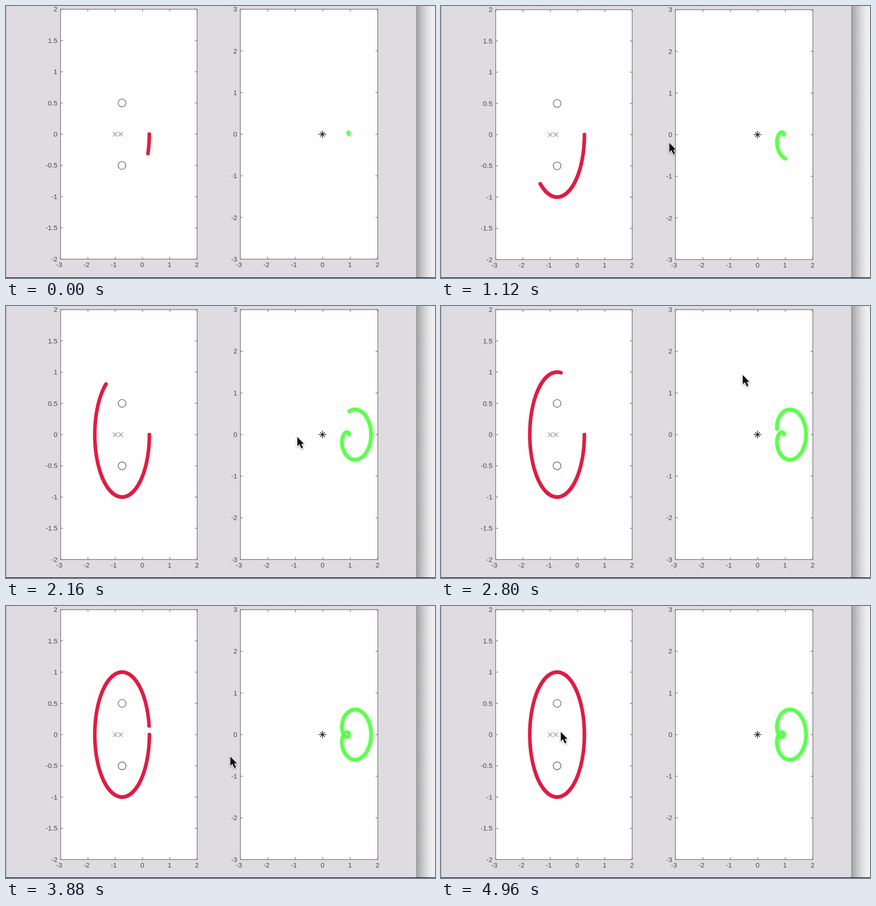
An HTML page with a canvas for the animation above (5000 ms loop, 938x596 px).

```html
<!DOCTYPE html>
<html lang="en">
<head>
<meta charset="utf-8">
<title>Contour mapping</title>
<style>
  html, body { margin: 0; width: 100%; height: 100%; overflow: hidden; background: #dedce0; }
  canvas { display: block; }
</style>
</head>
<body>
<canvas id="stage" width="938" height="596"></canvas>
<script>
const W = 938, H = 596, LOOP = 5000, TAU = Math.PI * 2;
const ctx = document.getElementById('stage').getContext('2d');

const makePlot = (left, right, yMax, yStep) => ({
  left, right, top: 8, bottom: 555.5, yMax, yStep,
  x: v => left + (v + 3) * (right - left) / 5,
  y: v => 281.8 - v * 273.75 / yMax
});
const sPlane = makePlot(119.5, 418, 2, 0.5);
const wPlane = makePlot(512.5, 813, 3, 1);

// Keyed values: [time, ...components]
const sweepKeys = [[0, 18], [680, 78], [1640, 188.8], [2160, 234], [2280, 244], [3440, 322], [3980, 360]];
const panKeys = [[0, -0.2, -0.9], [680, 0.8, 1.1], [1160, 0, 0]];
const pointerKeys = [
  [300, 420, 600], [680, 277, 283], [1640, 785, 322], [2160, 637, 287], [2840, 660, 150],
  [3120, 690, 22], [3440, 738, 307], [4320, 243, 353], [4960, 262, 276]
];

const linear = u => u;
const smooth = u => u * u * (3 - 2 * u);

function sample(keys, t, ease = linear) {
  if (t <= keys[0][0]) return keys[0].slice(1);
  const i = keys.findIndex(k => k[0] > t);
  if (i < 0) return keys[keys.length - 1].slice(1);
  const a = keys[i - 1], b = keys[i];
  const u = ease((t - a[0]) / (b[0] - a[0]));
  return a.slice(1).map((v, j) => v + (b[j + 1] - v) * u);
}

function line(x1, y1, x2, y2) {
  ctx.beginPath();
  ctx.moveTo(x1, y1);
  ctx.lineTo(x2, y2);
  ctx.stroke();
}

function stroke(color, width) {
  ctx.strokeStyle = color;
  ctx.lineWidth = width;
}

function cross(x, y, r) {
  line(x - r, y - r, x + r, y + r);
  line(x - r, y + r, x + r, y - r);
}

function drawWindow(gray) {
  ctx.fillStyle = gray;
  ctx.fillRect(-5, -5, W + 10, H + 10);
  const shade = ctx.createLinearGradient(898, 0, 932, 0);
  shade.addColorStop(0, '#a2a2a4');
  shade.addColorStop(0.3, '#c0c0c2');
  shade.addColorStop(0.7, '#e0e0e0');
  shade.addColorStop(1, '#eeeeee');
  ctx.fillStyle = shade;
  ctx.fillRect(898, -5, 50, H + 10);
  ctx.fillStyle = '#8f8f92';
  ctx.fillRect(897, -5, 1.5, H + 10);
  ctx.fillStyle = '#a9a8ab';
  ctx.fillRect(-5, -5, 6, H + 10);
}

function drawAxes(p) {
  ctx.fillStyle = '#fefefe';
  ctx.fillRect(p.left, p.top, p.right - p.left, p.bottom - p.top);
  stroke('#686868', 1.3);
  ctx.strokeRect(p.left, p.top, p.right - p.left, p.bottom - p.top);
  ctx.fillStyle = '#484848';
  ctx.font = '15px "Liberation Sans", Arial, sans-serif';
  ctx.textBaseline = 'middle';
  ctx.textAlign = 'right';
  for (let v = -3; v <= 2; v++) {
    const x = p.x(v);
    line(x, p.top, x, p.top + 5);
    line(x, p.bottom, x, p.bottom - 5);
    ctx.fillText(v, x + 3.5, 569);
  }
  for (let v = -p.yMax; v <= p.yMax; v += p.yStep) {
    const y = p.y(v);
    line(p.left, y, p.left + 5, y);
    line(p.right, y, p.right - 5, y);
    ctx.fillText(v, p.left - 7, y + 1);
  }
}

function drawMarkers() {
  stroke('#505068', 1.3);
  for (const v of [0.5, -0.5]) {
    ctx.beginPath();
    ctx.arc(sPlane.x(-0.75), sPlane.y(v), 8.5, 0, TAU);
    ctx.stroke();
  }
  stroke('#77778c', 1.2);
  for (const v of [-1, -0.8]) cross(sPlane.x(v), sPlane.y(0), 5);
  const x = wPlane.x(0) - 0.8, y = wPlane.y(0);
  stroke('#181818', 1.4);
  line(x - 8.5, y, x + 8.5, y);
  line(x, y - 8.5, x, y + 8.5);
  cross(x, y, 5);
}

function contour(degrees) {
  const a = -degrees * Math.PI / 180;
  return [Math.cos(a), Math.sin(a)];
}

// (z^2 + 1/4) / ((z + 1/4)(z + 1/20)), with z measured from the contour's centre
function transfer([a, b]) {
  const sq = a * a - b * b, ab = 2 * a * b;
  const nr = sq + 0.25, ni = ab;
  const dr = sq + 0.3 * a + 0.0125, di = ab + 0.3 * b;
  const m = dr * dr + di * di;
  return [(nr * dr + ni * di) / m, (ni * dr - nr * di) / m];
}

function drawContour(sweep) {
  ctx.fillStyle = '#df1d43';
  for (let d = 0; d <= sweep; d += 2) {
    const [re, im] = contour(d);
    ctx.beginPath();
    ctx.arc(sPlane.x(re - 0.75), sPlane.y(im), 4.1, 0, TAU);
    ctx.fill();
  }
}

function drawImage(sweep) {
  ctx.lineCap = ctx.lineJoin = 'round';
  ctx.beginPath();
  for (let d = 0; d <= sweep; d += 1) {
    const [re, im] = transfer(contour(d));
    ctx.lineTo(wPlane.x(re), wPlane.y(im));
  }
  stroke('rgba(110,255,95,0.45)', 10.5);
  ctx.stroke();
  stroke('#5cff4c', 7.5);
  ctx.stroke();
  ctx.lineCap = 'butt';
  ctx.lineJoin = 'miter';
}

function drawPointer(x, y) {
  ctx.save();
  ctx.translate(x, y);
  ctx.beginPath();
  for (const [px, py] of [[0, 0], [0, 20], [4.5, 16], [9, 25], [12.5, 23.5], [8.5, 15], [14.5, 15]]) ctx.lineTo(px, py);
  ctx.closePath();
  ctx.shadowColor = 'rgba(0,0,0,0.35)';
  ctx.shadowBlur = 4;
  ctx.shadowOffsetY = 2;
  stroke('#f4f4f4', 2);
  ctx.stroke();
  ctx.shadowColor = 'transparent';
  ctx.fillStyle = '#111';
  ctx.fill();
  ctx.restore();
}

function draw(t) {
  const [sweep] = sample(sweepKeys, t);
  const [dx, dy] = sample(panKeys, t);
  const light = Math.max(0, dy / 1.1);
  ctx.save();
  ctx.translate(dx, dy);
  drawWindow(`rgb(${222 + 2 * light}, ${220 + 4 * light}, 224)`);
  ctx.fillStyle = '#858585';
  ctx.fillRect(221, -2, 3, 2.5);
  ctx.fillRect(633, -2, 3, 2.5);
  drawAxes(sPlane);
  drawAxes(wPlane);
  drawMarkers();
  drawContour(sweep);
  drawImage(sweep);
  ctx.restore();
  if (t >= pointerKeys[0][0]) drawPointer(...sample(pointerKeys, t, smooth));
  ctx.fillStyle = '#080808';
  ctx.fillRect(0, H - 1.3, W, 2);
}

const start = performance.now();
function frame() {
  const t = (performance.now() - start) % LOOP;
  draw(Math.floor(t / 40) * 40);
  requestAnimationFrame(frame);
}
frame();
</script>
</body>
</html>
```
